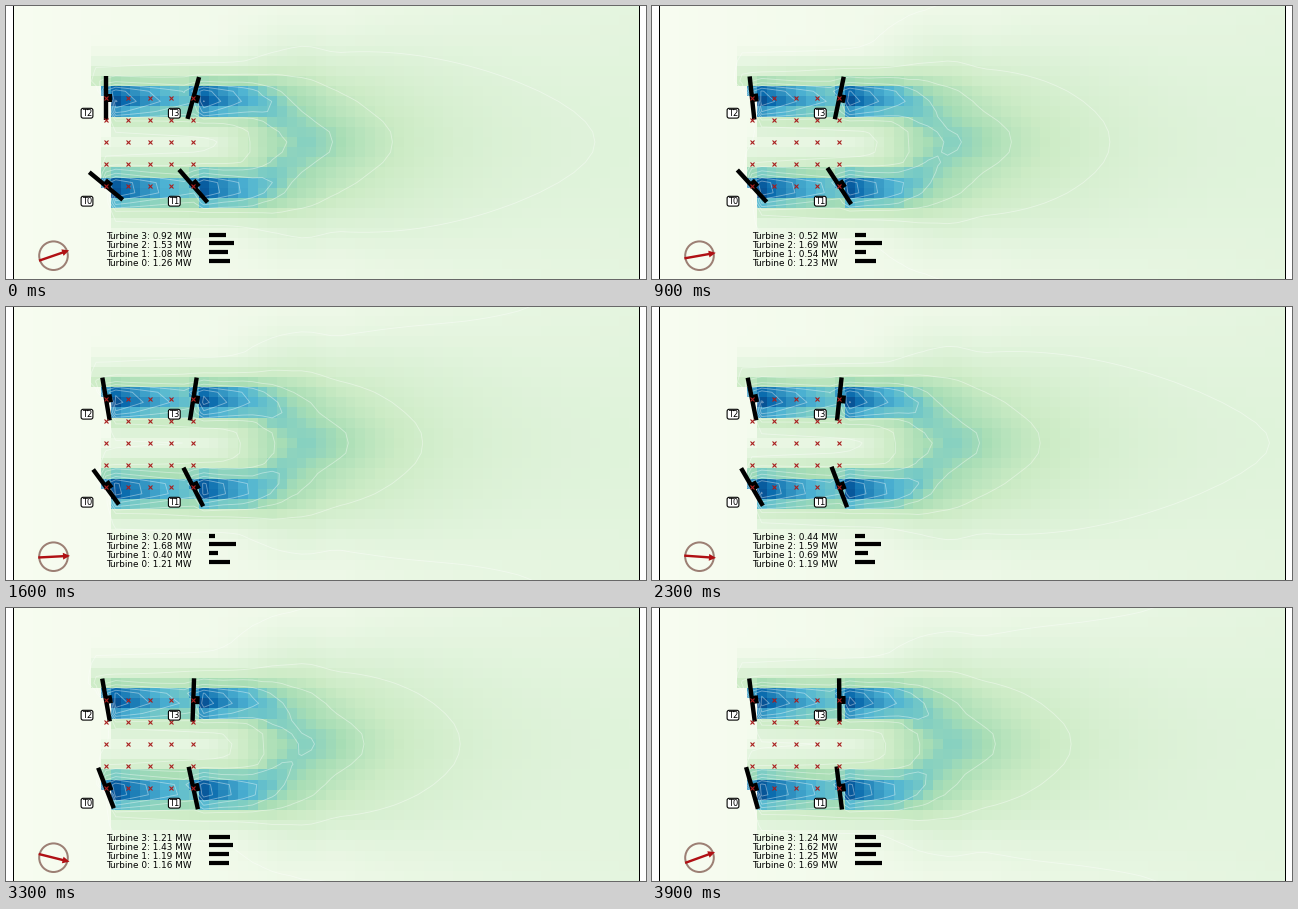
A matplotlib script for the animation above (4000 ms loop, 640 px wide and 273 px high).

```python
import numpy as np
import matplotlib.pyplot as plt
from matplotlib.animation import FuncAnimation
from matplotlib.patches import Circle, FancyBboxPatch, Polygon

W, H, DPI = 640, 273, 64
FRAMES, INTERVAL = 40, 100
PT = 72 / DPI  # points per pixel
LEFT, RIGHT, MID = 7, 633, 136
ROWS = (92, 180)    # hub heights of the two rows
COLS = (100, 187.3)
RED = "#b01014"

fig = plt.figure(figsize=(W / DPI, H / DPI), dpi=DPI, facecolor="white")
ax = fig.add_axes([0, 0, 1, 1])
ax.set_xlim(0, W)
ax.set_ylim(H, 0)
ax.axis("off")

# --- wind speed deficit on a coarse grid ---
x_edges = np.linspace(LEFT, RIGHT, 65)
y_edges = MID + 10.15 * (np.arange(-14, 16) - 0.5)
X, Y = np.meshgrid((x_edges[:-1] + x_edges[1:]) / 2,
                   (y_edges[:-1] + y_edges[1:]) / 2)


def bell(dist, width, power=2):
    return np.exp(-np.abs(dist / width) ** power)


def past(x0):
    return np.maximum(X - x0, 0)


def smooth(a, b):
    t = np.clip((X - a) / (b - a), 0, 1)
    return t * t * (3 - 2 * t)


def row_wake(hub, center):
    """Core and halo of two turbines in line; lower cells start a column later."""
    core = 0
    for x0, reach in zip(COLS, (120, 100)):
        start = np.where(Y < hub, x0 - 6, x0 + 4)
        near = np.where(X < x0 + 4, 0.75, 0.96 * np.exp(-past(x0 + 7) / reach))
        core = np.maximum(core, np.where(X > start, near, 0))
    ridge = MID + (center - MID) * (1 - smooth(240, 325))
    core = core * bell(Y - ridge, 18.5 + 0.1 * past(215), 3)

    halo = np.minimum(0.32 + 0.001 * past(95), 0.42) * np.exp(-past(270) / 70)
    start = np.where(Y < hub, 95, 105) - np.where(Y < 80, 10, 0)
    return core, np.where(X > start, halo, 0) * bell(Y - center, 34)


def deficit():
    merged = (0.1 + 0.34 * np.exp(-past(300) / 110)) / (1 + np.exp((234 - X) / 24))
    merged = merged * bell(Y - MID, 90 + 0.35 * past(330))
    floor = 0.1 * X / W
    parts = [*row_wake(ROWS[0], 93.5), *row_wake(ROWS[1], 182.5), merged, floor]
    return sum(p ** 4 for p in parts) ** 0.25


field = deficit()
ax.pcolormesh(x_edges, y_edges, field, cmap="GnBu", vmin=0, vmax=1,
              antialiased=False, zorder=0)
for edge in (LEFT, RIGHT):
    ax.plot([edge, edge], [0, H], color="black", lw=PT, zorder=2)


# --- wind and turbines ---
def wind_angle(frame):
    """Sawtooth: veers one degree per frame, then swings back."""
    return 20 - (frame + 1) % FRAMES


def stroke(width, color="black", zorder=4):
    return ax.plot([], [], lw=width * PT, color=color, zorder=zorder,
                   solid_capstyle="butt")[0]


def label(x, y, text, size, **kw):
    return ax.text(x, y, text, size=size * PT, family="DejaVu Sans",
                   va="baseline", zorder=7, **kw)


class Turbine:
    def __init__(self, index, tilt, loss=0, worst=0):
        self.index, self.tilt = index, tilt
        self.loss, self.worst = loss, worst  # wake loss and its worst wind angle
        self.x, self.y = COLS[index % 2], ROWS[1 - index // 2]
        self.blade, self.nacelle = stroke(4.4), stroke(8)
        self.bar = stroke(4.2)
        self.readout = label(100, 259.5 - 8.75 * index, "", 8.9)
        cx, cy = self.x - 19, self.y + 15.2
        ax.add_patch(FancyBboxPatch((cx - 5.9, cy - 4.9), 11.8, 9.8,
                                    boxstyle="round,pad=0,rounding_size=2",
                                    fc="white", ec="black", lw=1.1 * PT, zorder=6))
        label(cx, cy + 3.2, f"T{index}", 8.4, ha="center")

    def power(self, frame):
        wind = wind_angle(frame)
        aligned = np.cos(np.radians(self.tilt(frame) - wind)) ** 1.88
        return 1.7 * aligned * (1 - self.loss * bell(wind - self.worst, 14.4))

    def update(self, frame):
        a = np.radians(self.tilt(frame))
        s, c = np.sin(a), np.cos(a)
        x, y = self.x, self.y
        self.blade.set_data([x - 21.7 * s, x + 21.7 * s],
                            [y - 21.7 * c, y + 21.7 * c])
        self.nacelle.set_data([x, x + 6.3 * c], [y, y - 6.3 * s])
        power = self.power(frame)
        self.readout.set_text(f"Turbine {self.index}: {power:.2f} MW")
        level = 254.8 - 8.7 * self.index
        self.bar.set_data([203, 206.4 + 14.2 * power], [level, level])


turbines = [
    Turbine(0, lambda f: 50.5 - 0.89 * f),
    Turbine(1, lambda f: 41 - 0.87 * f, loss=0.73, worst=4.5),
    Turbine(2, lambda f: 11.5 * np.sin(np.pi * f / 50)),
    Turbine(3, lambda f: 0.41 * f - 15.5, loss=0.88, worst=2),
]

gx, gy = np.meshgrid(np.linspace(100, 187, 5), np.linspace(92.3, 180.3, 5))
ax.plot(gx.ravel(), gy.ravel(), "x", color="#a81e1e", ms=4 * PT, mew=1.1 * PT,
        zorder=5)

# --- compass ---
HUB = np.array([47.5, 249.7])
ax.add_patch(Circle(HUB, 14.3, fc="none", ec="#9c7f74", lw=2 * PT, zorder=5))
shaft = stroke(2.4, RED, 6)
head = ax.add_patch(Polygon([(0, 0)] * 3, fc=RED, ec="none", zorder=6))


def draw_arrow(frame):
    a = np.radians(wind_angle(frame))
    u = np.array([np.cos(a), -np.sin(a)])
    n = np.array([-u[1], u[0]])
    shaft.set_data(*zip(HUB - 15.3 * u, HUB + 11 * u))
    base = HUB + 9.5 * u
    head.set_xy([HUB + 16.5 * u, base + 3.4 * n, base - 3.4 * n])


contours = []


def draw_contours(frame):
    """Evenly spaced levels that rise by one step in 23.5 frames."""
    while contours:
        contours.pop().remove()
    levels = 0.133 * (np.arange(8) + frame / 23.5 % 1)
    levels = levels[(levels > 0.03) & (levels < field.max())]
    contours.append(ax.contour(X, Y, field, levels=levels, colors="white",
                               alpha=0.4, linewidths=0.9 * PT, zorder=1))


def update(frame):
    draw_contours(frame)
    for turbine in turbines:
        turbine.update(frame)
    draw_arrow(frame)
    return []


anim = FuncAnimation(fig, update, frames=FRAMES, interval=INTERVAL,
                     repeat=True, repeat_delay=0, blit=False)
plt.show()
```
